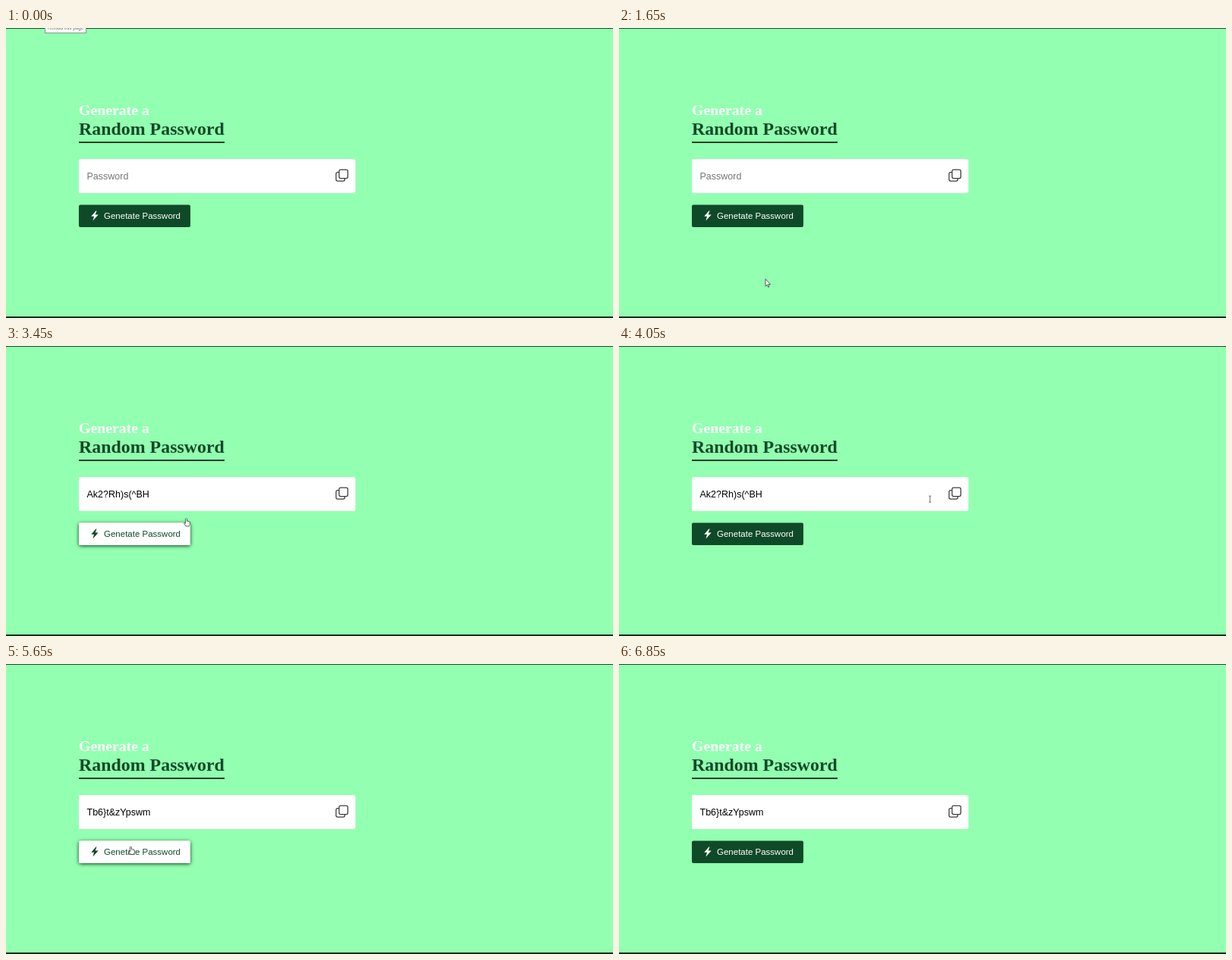
Write an HTML page that moves like this. It is 800 px wide and 383 px high and loops after 6.9 s.

```html
<!DOCTYPE html>
<html lang="en">
<head>
<meta charset="utf-8">
<title>Password generator</title>
<style>
  html, body { margin: 0; width: 100%; height: 100%; overflow: hidden; background: #93ffb1; }
  svg { display: block; width: 800px; height: 383px; font-family: "Liberation Sans", Arial, sans-serif; }
  .head { font-family: "Liberation Serif", "Times New Roman", serif; font-weight: bold; }
  #shadow { filter: drop-shadow(0 1px 2.5px #0b3d20); }
  .cursor { fill: #fff; stroke: #333; stroke-width: .8; stroke-linejoin: round; }
</style>
</head>
<body>
<svg viewBox="0 0 800 383">
  <rect width="800" height="383" fill="#93ffb1"/>
  <rect width="800" height="1" fill="#1d4a2c"/>
  <rect y="381" width="800" height="2" fill="#12301c"/>

  <g id="tip">
    <rect x="51.5" y="-5" width="54" height="11.5" fill="#fff" stroke="#8b988f"/>
    <text x="55" y="2.4" font-size="6.3" fill="#666">Reload this page</text>
  </g>

  <g class="head">
    <text x="96" y="115" font-size="19.8" fill="#fff">Generate a</text>
    <text x="96" y="141" font-size="23.9" fill="#0f4a26">Random Password</text>
  </g>
  <rect x="96" y="150" width="192" height="2" fill="#15402a"/>

  <rect x="96" y="173" width="364.5" height="45" rx="2" fill="#fff"/>
  <rect id="selection" x="106.5" y="188" width="82.5" height="14.5" fill="#3566cf"/>
  <text id="field" x="106.5" y="199.5" font-size="12.5"></text>
  <g fill="#fff" stroke="#3c3c3c" stroke-width="1.25">
    <rect x="435" y="190.5" width="11.5" height="11.5" rx="2"/>
    <rect x="439" y="187" width="11.5" height="11.5" rx="2"/>
  </g>

  <rect id="shadow" x="96" y="233.5" width="147" height="29.5" rx="2" fill="#fff"/>
  <rect id="button" x="96" y="233.5" width="147" height="29.5" rx="2"/>
  <g id="label">
    <path d="M118.5 241.5L112.3 248.8H116L114.5 254.5L121.7 246.6H117.6L119.5 241.5Z"/>
    <text x="129" y="252" font-size="11.5">Genetate Password</text>
  </g>

  <g id="pointer">
    <path id="hand" class="cursor" d="M-1 5V.8Q0-.6 1 .8V4Q2 3.2 2.6 4.3Q3.6 3.6 4 4.8Q5 4.4 5 5.7V7.5L4 10.5H-.5L-2.8 7Q-3 5.6-1.8 6.2L-1 7Z"/>
    <path id="arrow" class="cursor" d="M0 0V9.5L2.2 7.5L3.6 10.7L5 10.1L3.6 7H6.6Z"/>
    <path id="beam" d="M-1.5-4H1.5M0-4V4M-1.5 4H1.5" fill="none" stroke="#444" stroke-width=".8"/>
  </g>
</svg>
<script>
  const LOOP = 6900;
  const $ = id => document.getElementById(id);
  const clamp = v => Math.max(0, Math.min(1, v));
  const show = (id, on) => $(id).style.display = on ? "" : "none";

  // time, x, y of the pointer's hot spot
  const path = [
    [1400, 215, 390], [1950, 164.5, 255.5], [3050, 164.5, 255.5],
    [3450, 237.5, 227.5], [4250, 441.5, 197.5], [4850, 441.5, 197.5],
    [5300, 164.5, 241], [5700, 164.5, 241], [6350, 205, 395]
  ];
  const passwords = [[5450, "Tb6}t&zYpswm"], [2900, "Ak2?Rh)s(^BH"], [2200, "Uy3?0]%FSDUZ"]];

  function pointerAt(t) {
    const i = path.findIndex(p => p[0] > t);
    if (i < 1) return path[i ? path.length - 1 : 0].slice(1);
    const [a, b] = [path[i - 1], path[i]];
    const u = (t - a[0]) / (b[0] - a[0]);
    const k = u * u * (3 - 2 * u);
    return [a[1] + (b[1] - a[1]) * k, a[2] + (b[2] - a[2]) * k];
  }

  const fade = (t, from, to) => clamp((t - from) / 120) * clamp((to - t) / 120);
  const mix = (a, b, k) => `rgb(${a.map((v, i) => Math.round(v + (b[i] - v) * k))})`;

  function draw(now) {
    const t = now % LOOP;
    const [x, y] = pointerAt(t);
    const inside = (l, r, top, bottom) => x > l && x < r && y > top && y < bottom;
    const hand = inside(96, 243, 225, 263) || inside(433, 453, 185, 204);
    const beam = !hand && inside(96, 460, 173, 218);
    show("hand", hand);
    show("beam", beam);
    show("arrow", !hand && !beam);
    $("pointer").setAttribute("transform", `translate(${x} ${y})`);

    const hover = Math.max(fade(t, 1750, 3580), fade(t, 5130, 5980));
    $("shadow").style.opacity = hover;
    $("button").setAttribute("fill", mix([15, 74, 40], [255, 255, 255], hover));
    $("label").setAttribute("fill", mix([255, 255, 255], [15, 74, 40], hover));

    const entry = passwords.find(p => t >= p[0]);
    const selected = t >= 4500 && t < 5450;
    $("field").textContent = entry ? entry[1] : "Password";
    $("field").setAttribute("fill", selected ? "#fff" : entry ? "#000" : "#757575");
    show("selection", selected);
    show("tip", t < 300);
  }

  function tick() {
    draw(performance.now());
    requestAnimationFrame(tick);
  }
  tick();
</script>
</body>
</html>
```
